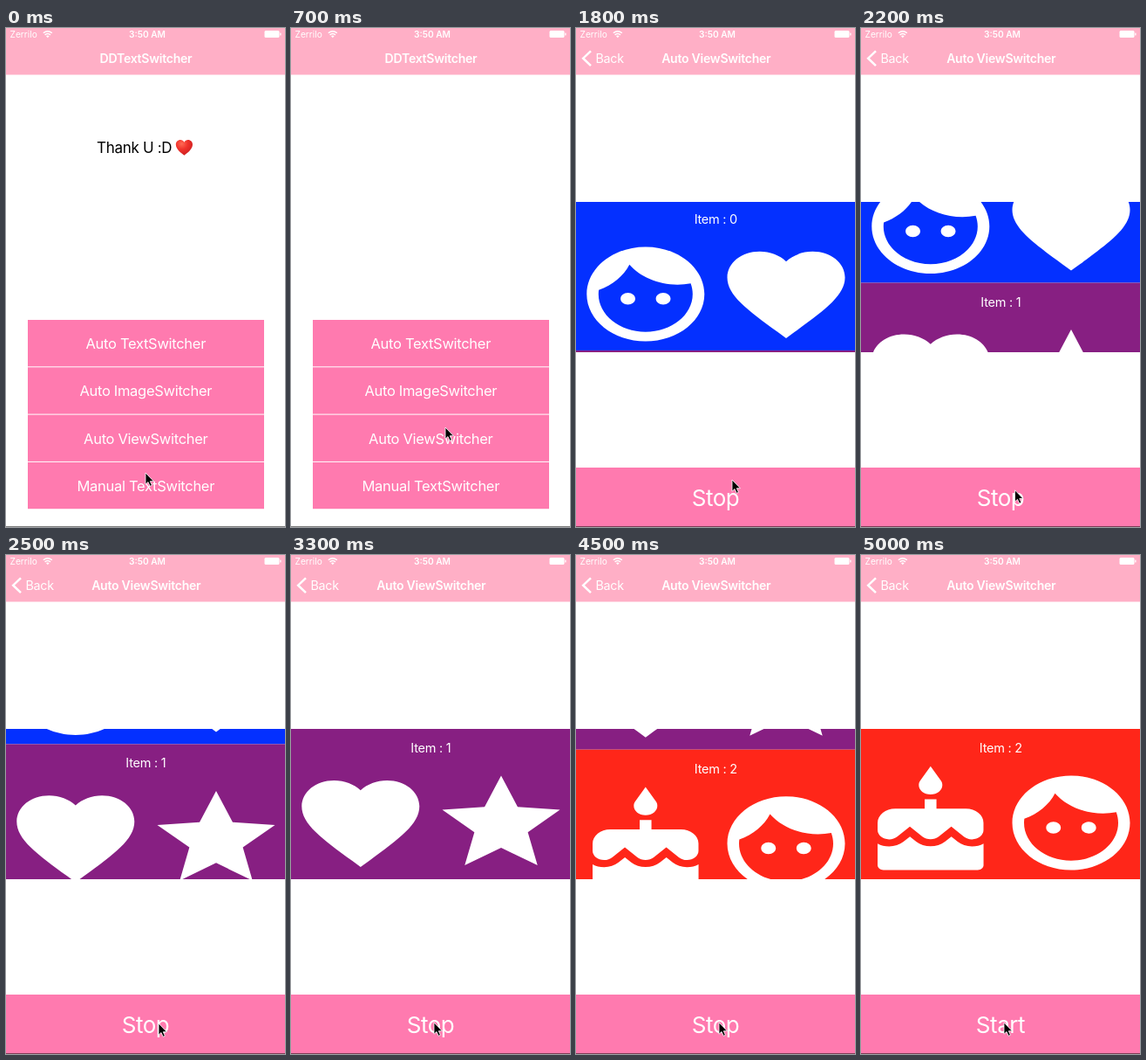
An HTML page that plays this animation: 320x571 px, repeating every 5.1 s.

```html
<!DOCTYPE html>
<html lang="en">
<head>
<meta charset="utf-8">
<title>DDTextSwitcher</title>
<style>
html, body { margin: 0; width: 100%; height: 100%; overflow: hidden; background: #fff; }
svg { display: block; width: 320px; height: 571px; }
text { font-family: Inter, Roboto, sans-serif; letter-spacing: -.018em; fill: #fff; }
.mid { text-anchor: middle; }
.row { font-size: 16.5px; }
.title { font-size: 14.05px; font-weight: 600; }
.status { font-size: 10.2px; letter-spacing: 0; }
</style>
</head>
<body>
<svg viewBox="0 0 320 571">
  <defs>
    <path id="face" fill-rule="evenodd" d="M9 11.75c-.69 0-1.25.56-1.25 1.25s.56 1.25 1.25 1.25 1.25-.56 1.25-1.25-.56-1.25-1.25-1.25zm6 0c-.69 0-1.25.56-1.25 1.25s.56 1.25 1.25 1.25 1.25-.56 1.25-1.25-.56-1.25-1.25-1.25zM12 2C6.48 2 2 6.48 2 12s4.48 10 10 10 10-4.48 10-10S17.52 2 12 2zm0 18c-4.41 0-8-3.59-8-8 0-.29.02-.58.05-.86 2.36-1.05 4.23-2.98 5.21-5.37C11.07 8.33 14.05 10 17.42 10c.78 0 1.53-.09 2.25-.26.21.71.33 1.47.33 2.26 0 4.41-3.59 8-8 8z"/>
    <path id="heart" d="M12 21.35l-1.45-1.32C5.4 15.36 2 12.28 2 8.5 2 5.42 4.42 3 7.5 3c1.74 0 3.41.81 4.5 2.09C13.09 3.81 14.76 3 16.5 3 19.58 3 22 5.42 22 8.5c0 3.78-3.4 6.86-8.55 11.54z"/>
    <path id="star" d="M12 17.27L18.18 21l-1.64-7.03L22 9.24l-7.19-.61L12 2 9.19 8.63 2 9.24l5.46 4.73L5.82 21z"/>
    <path id="cake" d="M12 6c1.11 0 2-.9 2-2 0-.38-.1-.73-.29-1.03L12 0l-1.71 2.97c-.19.3-.29.65-.29 1.03 0 1.1.9 2 2 2zm4.6 9.99l-1.07-1.07-1.08 1.07c-1.3 1.3-3.58 1.31-4.89 0l-1.07-1.07-1.09 1.07C6.75 16.64 5.88 17 4.96 17c-.73 0-1.4-.23-1.96-.61V21c0 .55.45 1 1 1h16c.55 0 1-.45 1-1v-4.61c-.56.38-1.23.61-1.96.61-.92 0-1.79-.36-2.44-1.01zM18 9h-5V7h-2v2H6c-1.66 0-3 1.34-3 3v1.54c0 1.08.88 1.96 1.96 1.96.52 0 1.02-.2 1.38-.57l2.14-2.13 2.13 2.13c.74.74 2.03.74 2.77 0l2.14-2.13 2.13 2.13c.37.37.86.57 1.38.57 1.08 0 1.96-.88 1.96-1.96V12C21 10.34 19.66 9 18 9z"/>
    <clipPath id="window"><rect y="199" width="320" height="172"/></clipPath>
    <radialGradient id="ruby" cx=".35" cy=".25" r=".8">
      <stop offset="0" stop-color="#ff6a55"/><stop offset=".45" stop-color="#f0322b"/><stop offset="1" stop-color="#c81d1f"/>
    </radialGradient>
    <linearGradient id="edge"><stop offset="0" stop-opacity="0"/><stop offset="1" stop-opacity=".06"/></linearGradient>
  </defs>

  <rect width="320" height="571" fill="#fff"/>
  <g id="menu">
    <g id="thanks">
      <text x="104" y="142.5" font-size="17" style="fill:#000">Thank U :D</text>
      <path transform="translate(192.9 125.2) scale(.96)" fill="url(#ruby)" d="M12 21.5C8 18.5 2 14 2 8.5 2 5.4 4.4 3 7.4 3c2 0 3.7 1.100 4.600 2.900C12.900 4.100 14.600 3 16.600 3 19.600 3 22 5.400 22 8.500 22 14 16 18.500 12 21.500z"/>
    </g>
    <g id="rows"></g>
  </g>
  <rect id="dim" y="54" width="320" height="517"/>
  <g id="page">
    <rect x="-8" y="54" width="8" height="517" fill="url(#edge)"/>
    <rect width="320" height="571" fill="#fff"/>
    <g id="views" clip-path="url(#window)"></g>
    <rect y="503" width="320" height="68" fill="#ff7aaf"/>
    <text id="action" class="mid" x="160" y="547" font-size="26"></text>
  </g>

  <rect width="320" height="53.500" fill="#ffafc6"/>
  <text id="home" class="title mid" x="160.500" y="39.600">DDTextSwitcher</text>
  <text id="title" class="title mid" x="160.800" y="39.600">Auto ViewSwitcher</text>
  <path id="chevron" d="M17 26.300L8.200 34.700 17 43.100" fill="none" stroke="#fff" stroke-width="2.500"/>
  <text id="back" x="22.500" y="39.700" font-size="14.300">Back</text>

  <text class="status" x="4.500" y="10.800">Zerrilo</text>
  <g fill="none" stroke="#fff" stroke-width="1.500">
    <path d="M42.800 5.800Q47.800 1.600 52.800 5.800M44.600 7.900Q47.800 5.200 51 7.900"/>
  </g>
  <path d="M46 9.300Q47.800 7.900 49.600 9.300L47.800 11.200z" fill="#fff"/>
  <text class="status mid" x="162" y="10.800" font-weight="600">3:50 AM</text>
  <rect x="296.500" y="3" width="17" height="8" rx="1.500" fill="#fff"/>
  <rect x="314.200" y="5.500" width="1.300" height="3" rx=".6" fill="#fff"/>
  <rect y="570" width="320" height="1" fill="#000" opacity=".5"/>
  <path id="cursor" d="M0 0V13.200L3 10.500 5.200 15.300 7.400 14.300 5.300 9.700H9.400z" stroke="#fff" stroke-width=".8"/>
</svg>
<script>
const $ = id => document.getElementById(id);
const LOOP = 5100, STEP = 100, VIEW_H = 172;

$('rows').innerHTML = ['Text', 'Image', 'View', 'Manual'].map((kind, i) => {
  const y = 334 + i * 54.3;
  const label = kind === 'Manual' ? 'Manual TextSwitcher' : `Auto ${kind}Switcher`;
  return `<rect x="25" y="${y}" width="271" height="53.3" fill="#ff7aaf"/>
    <text class="row mid" x="160.3" y="${y + 33}">${label}</text>`;
}).join('');

const icon = (name, cx) =>
  `<use href="#${name}" fill="#fff" transform="translate(${cx - 81} 241.7) scale(6.75 5.4)"/>`;

$('views').innerHTML = [
  ['#0430ff', 'face', 'heart'],
  ['#871f82', 'heart', 'star'],
  ['#ff2619', 'cake', 'face']
].map(([color, left, right], i) => `<g>
    <rect y="199" width="320" height="${VIEW_H}" fill="${color}"/>
    <text class="mid" x="160.3" y="226" font-size="14.5">Item : ${i}</text>
    ${icon(left, 79.8)}${icon(right, 241)}</g>`).join('');
const views = [...$('views').children];

const clamp = v => Math.max(0, Math.min(1, v));

// cubic-bezier(.42, 0, .58, 1)
function ease(x) {
  if (x <= 0) return 0;
  if (x >= 1) return 1;
  let lo = 0, hi = 1, s;
  for (let i = 0; i < 24; i++) {
    s = (lo + hi) / 2;
    const bx = 1.26 * s * (1 - s) ** 2 + 1.74 * s * s * (1 - s) + s ** 3;
    if (bx < x) lo = s; else hi = s;
  }
  return s * s * (3 - 2 * s);
}

// Critically damped spring: distance still to go
function spring(ms) {
  const u = Math.max(0, ms) * 0.01826;
  return (1 + u) * Math.exp(-u);
}

const path = [
  [0, 160, 509], [100, 160, 509], [600, 177, 457], [1100, 177, 457],
  [1800, 179, 517], [2500, 175, 536], [3000, 164, 535], [LOOP, 164, 535]
];
function pointer(t) {
  const i = path.findIndex((p, k) => k && t <= p[0]);
  const [t0, x0, y0] = path[i - 1], [t1, x1, y1] = path[i];
  const k = ease((t - t0) / (t1 - t0));
  return [x0 + (x1 - x0) * k, y0 + (y1 - y0) * k];
}

const move = (el, x, y = 0) => el.setAttribute('transform', `translate(${x.toFixed(2)} ${y.toFixed(2)})`);
const fade = (el, v) => el.setAttribute('opacity', clamp(v).toFixed(3));

function draw(t) {
  const left = t < 770 ? 1 : t > 1300 ? 0 : spring(t - 770);
  const done = 1 - left;
  move($('thanks'), 0, -200 * ease((t - 100) / 1000));
  move($('menu'), -96 * done);
  fade($('dim'), 0.1 * done);
  move($('page'), 320 * left + (left === 1 ? 10 : 0));

  move($('home'), -120 * done);
  fade($('home'), 1 - 1.6 * done);
  move($('title'), 230 * left);
  fade($('title'), done * 1.3);
  move($('back'), 90 * left);
  fade($('back'), (done - 0.9) / 0.1);
  fade($('chevron'), (done - 0.7) / 0.3);

  const shift = ease((t - 1722) / 1000) + ease((t - 3758) / 1000);
  views.forEach((v, i) => move(v, 0, (i - shift) * VIEW_H));
  $('action').textContent = t < 4700 ? 'Stop' : 'Start';
  move($('cursor'), ...pointer(t));
}

function tick() {
  draw(Math.floor(performance.now() % LOOP / STEP) * STEP);
  requestAnimationFrame(tick);
}
tick();
</script>
</body>
</html>
```
